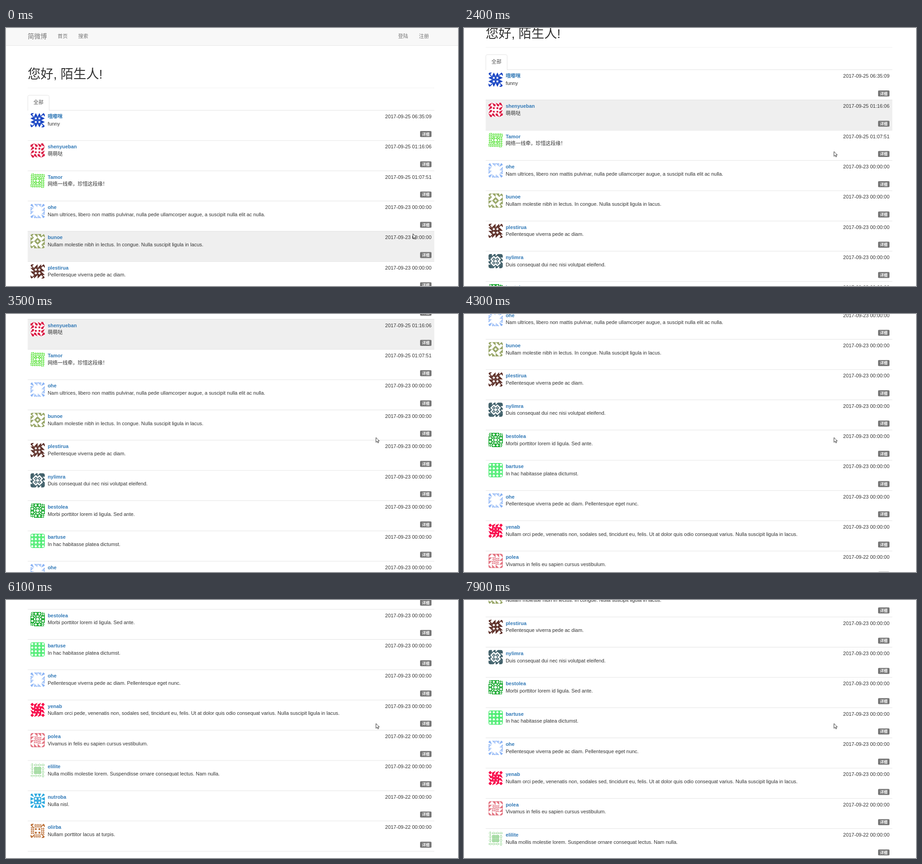
These frames come from a looping animation (989x566 px, 8 s). An HTML page:

```html
<!DOCTYPE html>
<html lang="zh-CN">
<head>
<meta charset="utf-8">
<style>
html, body { margin: 0; width: 100%; height: 100%; overflow: hidden; background: #fff; }
svg { display: block; width: 989px; height: 566px; }
text { font-family: "Liberation Sans", "Noto Sans CJK SC", "Noto Sans CJK", sans-serif; font-size: 10.93px; fill: #333; }
.nav { fill: #777; }
.name { font-weight: bold; fill: #337ab7; }
.tag { font-size: 8.2px; font-weight: bold; fill: #fff; text-anchor: middle; }
.date { text-anchor: end; }
</style>
</head>
<body>
<svg viewBox="0 0 989 566">
  <defs><clipPath id="round"><rect width="32" height="32" rx="4.7"/></clipPath></defs>
  <g id="page">
    <rect width="989" height="39" fill="#e7e7e7"/>
    <rect width="989" height="38" fill="#f8f8f8"/>
    <text class="nav" x="47.5" y="23.2" style="font-size:14.06px">简微博</text>
    <text class="nav" x="113" y="22">首页</text>
    <text class="nav" x="158" y="22">搜索</text>
    <text class="nav" x="858" y="22">登陆</text>
    <text class="nav" x="903.5" y="22">注册</text>
    <text x="47.5" y="111" style="font-size:28.1px">您好, 陌生人!</text>
    <rect x="47.5" y="131" width="889.7" height=".8" fill="#eee"/>
    <g id="rows"></g>
    <path d="M47.8 181V150.5q0-3 3-3h40.6q3 0 3 3V181" fill="#fff" stroke="#ddd" stroke-width=".8"/>
    <text x="60" y="167.4" style="fill:#555">全部</text>
  </g>
  <path id="cursor" d="M.5 .5V11L3 8.7 4.7 12.4 6.3 11.7 4.7 8.1H8Z" fill="#fff" stroke="#222" stroke-width=".9"/>
</svg>
<script>
const LOOP = 8000, TOP = 180.15, PITCH = 66.36, WHEEL = 78.1;
const $ = id => document.getElementById(id);

// Tile shapes on an 8 by 8 cell
const tiles = {
  n: '',
  f: 'M0 0h8v8h-8z',
  q: 'M0 0h8v8h-8zM2 2v4h4v-4z',
  c: 'M0 0h8v8h-8zM3 3v2.5h2.5v-2.5z',
  s: 'M2 2h4v4h-4z',
  t: 'M0 0h8L0 8z',
  r: 'M8 0V5L5 8H0z',
  d: 'M0 0h8v8h-8zM4 1L1 4 4 7 7 4z',
  o: 'M4 0L8 4 4 8 0 4z',
  h: 'M4 0L8 4 4 8 0 4zM4 2.5L2.5 4 4 5.5 5.5 4z',
  e: 'M0 0H4L8 8zM5 0H8V6z',
  w: 'M0 0L8 4 0 8z',
  k: 'M0 0L8 4V8H4z',
  v: 'M0 0h8L4 4 8 8H5L0 3z',
  z: 'M0 0h4v4zM4 0h4v4zM0 4h4v4zM4 4h4v4z',
  x: 'M4 0L6 2 4 4 2 2zM4 4L6 6 4 8 2 6zM0 3L2 4 0 5zM8 3L6 4 8 5z'
};

// Corner, edge and centre tiles, each with quarter turns
const icons = {
  blue: ['#1744c3', 'v0 w3 q0'],
  crimson: ['#db1f48', 'k1 k0 s0'],
  lime: ['#5be33c', 'z0 z1 h0'],
  sky: ['#8cb4f5', 'k2 e0 n0'],
  olive: ['#98a668', 'v0 t1 r0'],
  brown: ['#5e3029', 'v0 t2 d0'],
  slate: ['#42616b', 'f0 v1 h0'],
  green: ['#13a72a', 'z0 d0 h0'],
  mint: ['#4dec73', 'd0 d0 d0'],
  red: ['#f80a4b', 'o0 k1 c0'],
  rose: ['#e37582', 't0 t1 z0'],
  pale: ['#a8dca6', 'x0 x1 f0'],
  cyan: ['#2ca9df', 'k2 w1 q0'],
  copper: ['#bc7139', 'v0 z1 s0']
};

const posts = [
  ['哦嘟咪', 'funny', 'blue', '25 06:35:09'],
  ['shenyueban', '萌萌哒', 'crimson', '25 01:16:06'],
  ['Tamor', '网络一线牵，珍惜这段缘！', 'lime', '25 01:07:51'],
  ['ohe', 'Nam ultrices, libero non mattis pulvinar, nulla pede ullamcorper augue, a suscipit nulla elit ac nulla.', 'sky', 23],
  ['bunoe', 'Nullam molestie nibh in lectus. In congue. Nulla suscipit ligula in lacus.', 'olive', 23],
  ['plestirua', 'Pellentesque viverra pede ac diam.', 'brown', 23],
  ['nylimra', 'Duis consequat dui nec nisi volutpat eleifend.', 'slate', 23],
  ['bestolea', 'Morbi porttitor lorem id ligula. Sed ante.', 'green', 23],
  ['bartuse', 'In hac habitasse platea dictumst.', 'mint', 23],
  ['ohe', 'Pellentesque viverra pede ac diam. Pellentesque eget nunc.', 'sky', 23],
  ['yenab', 'Nullam orci pede, venenatis non, sodales sed, tincidunt eu, felis. Ut at dolor quis odio consequat varius. Nulla suscipit ligula in lacus.', 'red', 23],
  ['polea', 'Vivamus in felis eu sapien cursus vestibulum.', 'rose', 22],
  ['elilite', 'Nulla mollis molestie lorem. Suspendisse ornare consequat lectus. Nam nulla.', 'pale', 22],
  ['nutroba', 'Nulla nisl.', 'cyan', 22],
  ['olirba', 'Nullam porttitor lacus at turpis.', 'copper', 22]
];

function tile(code, x, y) {
  return `<path fill-rule="evenodd" d="${tiles[code[0]]}" transform="translate(${x} ${y}) rotate(${code[1] * 90} 4 4)"/>`;
}

function icon(key, y) {
  const [color, code] = icons[key];
  const [corner, edge, inner] = code.split(' ');
  const part = tile(corner, 0, 0) + tile(edge, 8, 0) + tile(edge, 16, 0) + tile(inner, 8, 8);
  const turns = [0, 90, 180, 270].map(a => `<g transform="rotate(${a} 16 16)">${part}</g>`).join('');
  return `<g transform="translate(53.4 ${y}) scale(.985)" clip-path="url(#round)">
    <rect width="32" height="32" fill="#fff"/><g fill="${color}">${turns}</g></g>`;
}

const rowTop = i => TOP + PITCH * i;
const rule = y => `<rect x="47.5" y="${y}" width="889.7" height=".8" fill="#ddd"/>`;

function row([name, body, key, when], i) {
  const y = rowTop(i);
  const date = '2017-09-' + (typeof when === 'number' ? when + ' 00:00:00' : when);
  return `<rect class="bg" x="47.5" y="${y}" width="889.7" height="${PITCH}" fill="#fff"/>
    ${rule(y)}
    ${icon(key, y + 6.4)}
    <text class="name" x="91.2" y="${y + 17.8}">${name}</text>
    <text x="91.2" y="${y + 33.5}">${body}</text>
    <text class="date" x="931" y="${y + 17.8}">${date}</text>
    <rect x="906" y="${y + 45.9}" width="25" height="13.2" rx="2" fill="#777"/>
    <text class="tag" x="918.5" y="${y + 55.4}">详细</text>`;
}

$('rows').innerHTML = posts.map(row).join('') + rule(rowTop(posts.length));
const backs = [...document.querySelectorAll('.bg')];

// Wheel notches: start, direction, duration
const notches = [
  [1450, 1], [2353, 1], [2955, 1], [3485, 1], [4060, 1], [4660, 1],
  [5360, 1], [5895, 1], [6560, -1], [7680, -1, 268]
];
const clamp = u => Math.max(0, Math.min(1, u));
const smooth = u => u * u * (3 - 2 * u);

function scrollAt(t) {
  return notches.reduce((sum, [start, dir, dur = 200]) =>
    sum + dir * WHEEL * smooth(clamp((t - start) / dur)), 0);
}

function pointerAt(t) {
  const u = 1 - (1 - clamp(t / 900)) ** 1.4;
  const rest = 1 - clamp((t - 900) / 200);
  return [890 - 81 * u + 3 * rest * u, 451 - 180.5 * u + rest * u];
}

function draw(time) {
  const t = Math.floor(time % LOOP / 100) * 100;
  const [x, y] = pointerAt(t);
  const over = Math.floor((y - TOP) / PITCH);
  backs.forEach((b, i) => b.setAttribute('fill', i === over ? '#efefef' : '#fff'));
  $('page').setAttribute('transform', `translate(0 ${-scrollAt(t)})`);
  $('cursor').setAttribute('transform', `translate(${x} ${y})`);
}

const began = performance.now();
function tick() {
  draw(performance.now() - began);
  requestAnimationFrame(tick);
}
tick();
</script>
</body>
</html>
```
